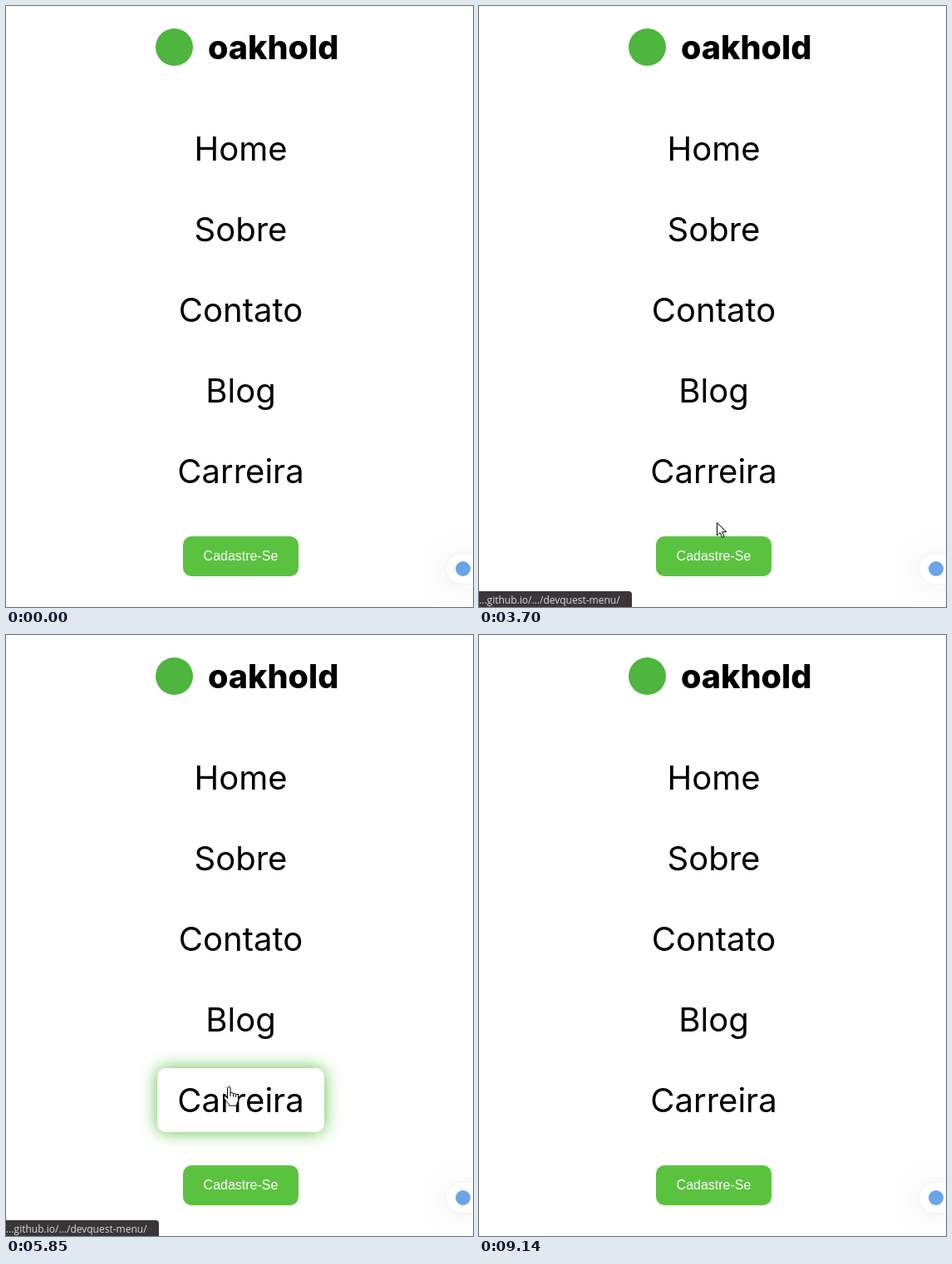
These frames come from a looping animation (562x723 px, 9600 ms). An HTML page:

```html
<!DOCTYPE html>
<html lang="pt-BR">
<head>
<meta charset="utf-8">
<title>Menu</title>
<style>
  html, body { margin: 0; width: 100%; height: 100%; overflow: hidden; background: #fff; }
  main { position: relative; width: 100%; height: 100%; overflow: clip; contain: strict; }
  main > * { position: absolute; box-sizing: border-box; white-space: nowrap; }
  .logo { left: 180px; top: 27px; width: 45px; height: 45px; border-radius: 50%; background: #4eb53e; }
  h1 { left: 243px; top: 28px; margin: 0; font: 800 39.5px/45px Inter, sans-serif; color: #000; }
  .item {
    left: 182px; width: 201px; height: 77px; border-radius: 10px;
    font: 40px/78px Inter, sans-serif; text-align: center;
  }
  .button {
    left: 213px; top: 638px; width: 139px; height: 48px; border-radius: 10px; background: #5ac23f;
    font: 16px/47px "Liberation Sans", Arial, sans-serif; text-align: center; color: #fff;
  }
  .bubble {
    right: 0; top: 659px; width: 32px; height: 36px; border-radius: 18px 0 0 18px; background: #fff;
    box-shadow: 0 4px 40px rgba(0, 0, 0, .1), 0 0 3px rgba(0, 0, 0, .06);
  }
  .bubble::after {
    content: ""; position: absolute; left: 11px; top: 9px; width: 18px; height: 18px;
    border-radius: 50%; background: #6aa5e8;
  }
  .status {
    left: 0; top: 704px; width: 184px; height: 19px; border-radius: 0 4px 0 0; background: #3a3539;
    font: 12px/21px "Open Sans", sans-serif; color: #dedcde;
  }
  svg { left: 0; top: 0; fill: #fff; stroke: #000; stroke-linejoin: round; }
</style>
</head>
<body>
<main>
  <div class="logo"></div>
  <h1>oakhold</h1>
  <div class="button">Cadastre-Se</div>
  <div class="bubble"></div>
  <div class="status">...github.io/.../devquest-menu/</div>
  <svg id="arrow" width="20" height="25">
    <path d="M.5 .5V16l3.6-3.4 2.6 5.9 2.5-1.1-2.6-5.7h5z"/>
  </svg>
  <svg id="hand" width="20" height="25">
    <path d="M5.5 14.5V2.3a1.8 1.8 0 0 1 3.6 0v6a1.8 1.8 0 0 1 3.4.8 1.8 1.8 0 0 1 3.2.9 1.6 1.6 0 0 1 2.8 1.2v5c0 3-2 4-2 7h-9c0-2.5-5-6.5-6-9.5-.4-1.5 1.5-2.3 2.5-1.2z"/>
    <path d="M9.1 8v4M12.5 9v3.5M15.7 10v3" fill="none"/>
  </svg>
</main>
<script>
const LOOP = 9600;
const FADE = 300;            // hover colour transition
const PAGE_LAG = 40;         // the page follows the pointer
const SHAPE_LAG = 15;        // so does the pointer's own shape
const STATUS_DELAY = 540;
const TOP = 133, PITCH = 97, HEIGHT = 77;
const BLACK = [0, 0, 0], WHITE = [255, 255, 255], GREEN = [90, 194, 63];

const arrow = document.getElementById('arrow');
const hand = document.getElementById('hand');
const status = document.querySelector('.status');

const items = ['Home', 'Sobre', 'Contato', 'Blog', 'Carreira'].map((label, i) => {
  const el = document.createElement('div');
  el.className = 'item';
  el.textContent = label;
  el.style.top = TOP + PITCH * i + 'px';
  arrow.before(el);
  return el;
});

// Turning points of the pointer: time, x, y
const path = [
  [920, 531, 331], [1280, 382, 209], [1620, 327, 150], [1820, 327, 150],
  [2860, 304, 429], [3850, 283, 655], [4350, 283, 655], [4680, 305, 479],
  [4750, 318, 396], [5100, 325, 165], [5380, 320, 165], [5710, 296, 372],
  [5780, 282, 506], [5850, 268, 543], [6350, 284, 664], [7010, 284, 664],
  [7140, 290, 600], [7320, 317, 205], [7780, 322, 168], [8180, 322, 168],
  [8390, 528, 90], [8520, 528, 90], [8800, 490, 148], [9140, 490, 357]
];

const mix = (a, b, k) => a + (b - a) * k;
const blend = (from, to, k) => `rgb(${from.map((c, i) => Math.round(mix(c, to[i], k)))})`;
const between = (v, low, high) => v >= low && v < high;
const show = (el, on) => { el.style.visibility = on ? 'visible' : 'hidden'; };

function pointAt(t) {
  const i = path.findIndex(p => p[0] > t);
  if (i < 1) return path.at(i).slice(1);
  const [t0, x0, y0] = path[i - 1], [t1, x1, y1] = path[i];
  const k = (t - t0) / (t1 - t0);
  return [mix(x0, x1, k), mix(y0, y1, k)];
}

function inMenu(t) {
  const [x, y] = pointAt(t);
  return between(x, 182, 383) && between(y, TOP, TOP + PITCH * 4 + HEIGHT);
}

function itemAt(t) {
  const y = pointAt(t)[1] - TOP;
  return inMenu(t) && y % PITCH < HEIGHT ? Math.floor(y / PITCH) : -1;
}

function onButton(t) {
  const [x, y] = pointAt(t);
  return between(x, 213, 352) && between(y, 638, 686);
}

// How long the pointer has rested on its item, up to the fade time
function dwell(t) {
  const item = itemAt(t);
  let ms = 0;
  while (ms < FADE && itemAt(t - ms - 5) === item) ms += 5;
  return ms;
}

function draw(t) {
  const seen = t - PAGE_LAG;
  const hovered = itemAt(seen);
  const level = dwell(seen) / FADE;

  items.forEach((el, i) => {
    const on = i === hovered;
    el.style.color = blend(BLACK, WHITE, on ? level : 0);
    el.style.background = on ? blend(WHITE, GREEN, level) : 'none';
    el.style.boxShadow = on ? '0 0 20px #5ac23f' : 'none';
  });

  const visible = between(t, path[0][0], path.at(-1)[0]);
  const pointing = itemAt(t - SHAPE_LAG) >= 0 || onButton(t - SHAPE_LAG);
  const [x, y] = pointAt(t).map(Math.round);
  arrow.style.transform = `translate(${x}px, ${y}px)`;
  hand.style.transform = `translate(${x - 7}px, ${y}px)`;
  show(arrow, visible && !pointing);
  show(hand, visible && pointing);
  show(status, inMenu(t - STATUS_DELAY));
}

function tick() {
  draw(performance.now() % LOOP);
  requestAnimationFrame(tick);
}
tick();
</script>
</body>
</html>
```
